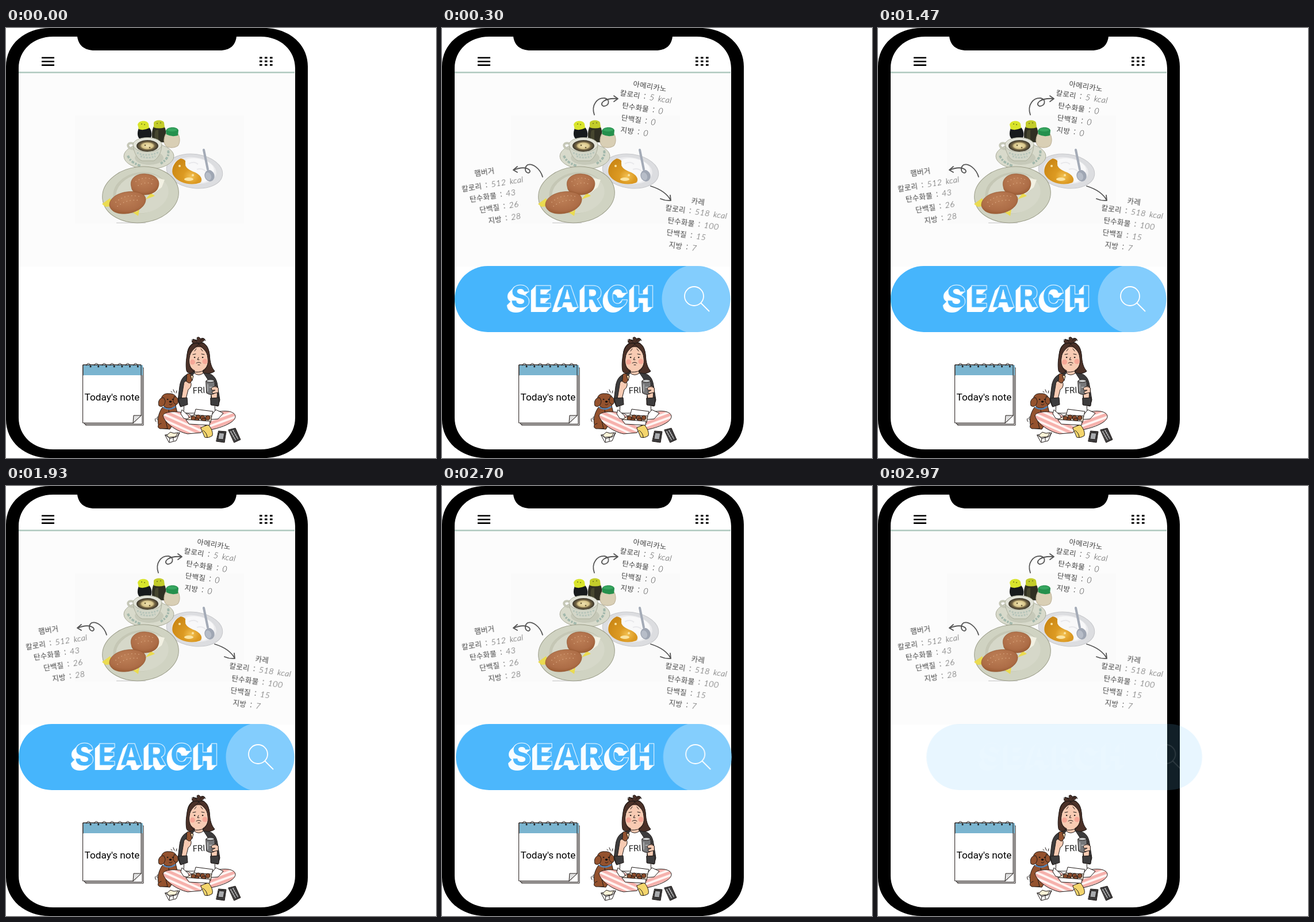
These frames come from a looping animation (748 by 748 pixels, 3.01 s). An HTML page:

```html
<!DOCTYPE html>
<html lang="ko">
<head>
<meta charset="utf-8">
<title>Meal search</title>
<style>
html, body { margin: 0; width: 100%; height: 100%; overflow: hidden; background: #fff; }
svg { display: block; width: 100vw; height: 100vh; }

.slide { animation: slide 3010ms linear infinite; }
.fade { animation: fade 3010ms linear infinite; }
.soft { animation: soft 3010ms linear infinite; }
.notes { animation: appear 3010ms linear infinite; }

@keyframes slide {
  0% { transform: translateX(-71px); }
  10%, 89.4% { transform: none; }
  100% { transform: translateX(71px); }
}
@keyframes fade {
  0%, 100% { opacity: 0; }
  10%, 89.4% { opacity: 1; }
}
@keyframes soft {
  0% { opacity: 0; animation-timing-function: ease-in; }
  10%, 89.4% { opacity: 1; }
  100% { opacity: 0; }
}
@keyframes appear {
  0% { opacity: 0; }
  10%, 100% { opacity: 1; }
}

.notes text { font: 300 12.5px "Noto Sans CJK KR", "Noto Sans CJK", "Noto Sans CJK JP", sans-serif; letter-spacing: .3px; word-spacing: 2.5px; fill: #444; }
.notes tspan { font: italic 300 14.5px Lato, sans-serif; }
.notes path { fill: none; stroke: #555; stroke-width: 1.8; stroke-linecap: round; stroke-linejoin: round; }
.search { font: 800 52px Inter, sans-serif; letter-spacing: 6.5px; text-anchor: middle; }
.ink { stroke: #201a18; stroke-width: 1; stroke-linejoin: round; stroke-linecap: round; }
.line { fill: none; }
.skin { fill: #f8cbb3; }
.dark { fill: #3d3c3d; }
.hair { fill: #4b3128; }
.dog { fill: #94522e; }
.white { fill: #fff; }
</style>
</head>
<body>
<svg viewBox="0 0 748 748" xmlns="http://www.w3.org/2000/svg">
<defs>
  <text id="word" class="search" x="247.500" y="486">SEARCH</text>
  <mask id="shade" maskUnits="userSpaceOnUse" x="80" y="430" width="320" height="80">
    <g id="depth" fill="#fff"></g>
    <use href="#word" fill="#000"/>
  </mask>
  <clipPath id="pill"><rect x="22" y="414" width="479.5" height="115" rx="57.5"/></clipPath>
  <pattern id="stripe" width="9" height="9" patternUnits="userSpaceOnUse" patternTransform="rotate(24)">
    <rect width="9" height="9" fill="#fff6f4"/><rect width="9" height="5.2" fill="#f6b1ac"/>
  </pattern>
  <pattern id="stripe2" width="9" height="9" patternUnits="userSpaceOnUse" patternTransform="rotate(-20)">
    <rect width="9" height="9" fill="#fff6f4"/><rect width="9" height="5.2" fill="#f6b1ac"/>
  </pattern>
  <radialGradient id="bun" cx=".45" cy=".35" r=".7">
    <stop offset="0" stop-color="#bd7f56"/><stop offset=".7" stop-color="#ad6d47"/><stop offset="1" stop-color="#96572f"/>
  </radialGradient>
  <radialGradient id="curry" cx=".65" cy=".7" r=".8">
    <stop offset="0" stop-color="#f3c153"/><stop offset=".35" stop-color="#dc9a22"/><stop offset="1" stop-color="#c98514"/>
  </radialGradient>
  <radialGradient id="coffee">
    <stop offset="0" stop-color="#f0e2b0"/><stop offset=".5" stop-color="#d9c68b"/><stop offset=".68" stop-color="#746544"/><stop offset="1" stop-color="#39342a"/>
  </radialGradient>
</defs>

<!-- Screen -->
<rect x="22" y="79" width="480" height="336" fill="#fcfcfc"/>
<rect x="120" y="152" width="294" height="188" fill="#fafafa"/>
<rect x="22" y="76" width="480" height="2.6" fill="#b1cac1"/>
<path fill-rule="evenodd" d="M76 0H449C492 0 525 28 525 67V681C525 720 492 748 449 748H76C33 748 0 720 0 681V67C0 28 33 0 76 0Z
  M82 15H124C126 30 136 39 154 39H372C390 39 399 30 401 15H443C478 15 503 39 503 70V678C503 709 478 733 443 733H82C47 733 22 709 22 678V70C22 39 47 15 82 15Z"/>
<path stroke="#000" stroke-width="2.6" d="M62 51.8H84M62 58.2H84M62 64.6H84"/>
<path stroke="#000" stroke-width="3" stroke-dasharray="4.6 4.4" d="M441 51.7H464M441 58H464M441 64.3H464"/>

<!-- Sauce bottles -->
<g>
  <path fill="#171a1c" d="M231 174C227 184 229 192 235 194H250C255 189 254 178 249 173Z"/>
  <path fill="#d9e52c" d="M229 168C231 160 246 160 248 167L249 174Q239 179 231 176Z"/>
  <path fill="#2f2f22" d="M257 171C252 182 253 194 258 198L275 199C280 190 279 176 275 171Z"/>
  <path fill="#c3cc2b" d="M257 165C258 159 274 159 275 165L276 173Q266 176 257 173Z"/>
  <path fill="#46462f" d="M260 178Q257 188 260 194L265 195V177Z"/>
  <path fill="#d9cfb5" stroke="#b9ad92" d="M278 184C273 193 274 204 281 207Q291 210 299 205C304 198 302 188 299 184Z"/>
  <path fill="#25904d" d="M278 179C280 171 298 171 300 178L299 187Q288 190 279 185Z"/>
  <ellipse cx="289" cy="177" rx="9" ry="3" fill="#37a660"/>
  <g fill="#6f7517"><circle cx="236" cy="167" r="1"/><circle cx="241" cy="168" r="1"/><circle cx="263" cy="166" r="1"/><circle cx="269" cy="165" r="1"/></g>
</g>

<!-- Curry -->
<g>
  <ellipse cx="328" cy="249" rx="49" ry="29.5" transform="rotate(8 328 249)" fill="#dcdde0" stroke="#c6c7ca"/>
  <ellipse cx="327" cy="248" rx="39" ry="23" transform="rotate(8 327 248)" fill="#ececee"/>
  <path fill="url(#curry)" d="M304 227C292 232 286 247 291 256C299 270 322 275 338 269C344 262 336 254 329 251C321 247 315 246 312 239Q316 229 304 227Z"/>
  <path fill="#f8f8f9" d="M313 229C325 223 348 228 357 237C370 250 354 267 341 269Q343 258 329 251C316 247 309 239 313 229Z"/>
  <path fill="none" stroke="#e9e9ec" stroke-width="2" d="M318 236Q328 231 334 237M332 246Q341 243 347 249"/>
  <g fill="#fae3a0"><ellipse cx="318" cy="263" rx="8" ry="3"/><circle cx="302" cy="240" r="2"/><circle cx="325" cy="256" r="2"/></g>
  <path stroke="#a4abb7" stroke-width="4" stroke-linecap="round" d="M344 212L351 246"/>
  <ellipse cx="354" cy="257" rx="8.5" ry="10" transform="rotate(-18 354 257)" fill="#9fa6b3"/>
  <ellipse cx="352" cy="258" rx="5" ry="7" transform="rotate(-18 352 258)" fill="#b7bdc8"/>
</g>

<!-- Coffee cup -->
<g>
  <ellipse cx="248.500" cy="223" rx="43.500" ry="22.500" fill="#d8dacb" stroke="#a9ab98"/>
  <ellipse cx="249" cy="226" rx="25" ry="12" fill="#c6c9b9"/>
  <g fill="none" stroke="#a3b8ac" stroke-width="4" stroke-dasharray="5 2 3 2">
    <path d="M212 222Q216 234 235 240M282 213Q285 226 269 236"/>
  </g>
  <path fill="none" stroke="#c5c7b7" stroke-width="4" d="M226 210C215 212 209 205 214 201Q219 199 226 203"/>
  <path fill="#d3d6c8" stroke="#a3a591" stroke-width=".8" d="M221 203C222 217 229 229 237 231H257C266 226 271 214 271 202Z"/>
  <path fill="none" stroke="#b7c5ba" stroke-width="3" stroke-dasharray="3 2" d="M228 217Q244 225 266 216M234 223Q246 228 260 223"/>
  <ellipse cx="246" cy="203" rx="25" ry="12.500" fill="#e2e3d8" stroke="#a3a591" stroke-width=".8"/>
  <ellipse cx="246" cy="205" rx="19" ry="10" fill="url(#coffee)"/>
  <circle cx="242" cy="204" r="1.300" fill="#6d5e3b"/><circle cx="250" cy="208" r="1.300" fill="#6d5e3b"/>
</g>

<!-- Burgers -->
<g>
  <path stroke="#ddd" stroke-width="2" d="M192 339H243"/>
  <ellipse cx="234" cy="290" rx="66.500" ry="48.500" transform="rotate(-7 234 290)" fill="#d0d3c2" stroke="#9a9c87"/>
  <ellipse cx="234" cy="287" rx="48" ry="36" transform="rotate(-10 234 287)" fill="#c5c7b5"/>
  <ellipse cx="237" cy="288" rx="46" ry="34" transform="rotate(-10 237 288)" fill="#d6d8c9"/>
  <path fill="#f2f1e3" d="M258 260L276 264L271 277L254 290Z"/>
  <path fill="#eadb51" d="M167 306L181 296L188 310L173 311ZM218 319L230 327L232 316ZM243 298L259 292L252 287Z"/>
  <path fill="#f4efdb" d="M180 308Q199 326 228 319L243 296L230 290Z"/>
  <path fill="url(#bun)" stroke="#93552f" stroke-width=".7" d="M218 276C214 261 229 252 244 254C259 255 269 264 265 276C262 288 247 291 235 290C225 288 219 285 218 276Z"/>
  <path fill="url(#bun)" stroke="#93552f" stroke-width=".7" d="M180 309C179 297 193 287 211 285C230 283 244 289 243 299C242 312 226 322 207 323C192 324 182 318 180 309Z"/>
  <path fill="none" stroke="#dcaa83" stroke-width="1.500" stroke-linecap="round" stroke-dasharray=".1 6" d="M226 267Q240 257 256 264M230 274Q244 266 256 272M191 303Q208 288 232 293M194 310Q211 297 232 300"/>
</g>

<!-- Nutrition notes -->
<g class="notes">
  <path d="M265 151C259 134 270 121 283 122C293 124 291 136 281 136C273 133 280 121 306 123M299 118L306 123L299 128"/>
  <path d="M175 259C171 245 158 235 149 238C142 243 145 253 151 252C158 248 146 238 125 247M131 241L124 247L131 251"/>
  <path d="M363 275Q389 283 398 300M380 297Q389 301 398 300L397 291"/>
  <g transform="translate(309 117) rotate(9)">
    <text x="20" y="-19">아메리카노</text>
    <text>칼로리 : <tspan>5 kcal</tspan></text>
    <text x="7" y="21">탄수화물 : <tspan>0</tspan></text>
    <text x="9" y="42">단백질 : <tspan>0</tspan></text>
    <text x="11" y="63">지방 : <tspan>0</tspan></text>
  </g>
  <g transform="translate(35 285) rotate(-9)">
    <text x="26" y="-23">햄버거</text>
    <text>칼로리 : <tspan>512 kcal</tspan></text>
    <text x="11" y="20">탄수화물 : <tspan>43</tspan></text>
    <text x="25" y="41">단백질 : <tspan>26</tspan></text>
    <text x="37" y="62">지방 : <tspan>28</tspan></text>
  </g>
  <g transform="translate(388 317) rotate(8)">
    <text x="43" y="-18">카레</text>
    <text>칼로리 : <tspan>518 kcal</tspan></text>
    <text x="7" y="21">탄수화물 : <tspan>100</tspan></text>
    <text x="8" y="42">단백질 : <tspan>15</tspan></text>
    <text x="15" y="63">지방 : <tspan>7</tspan></text>
  </g>
</g>

<!-- Notepad -->
<g class="ink">
  <path class="white" d="M139 591H239V691H139Z"/>
  <path class="white" d="M137 589H237V689H137Z"/>
  <path class="white" d="M134 586H235V674L221 687H134Z"/>
  <path fill="#7ab4cf" stroke="none" d="M134.600 586.600H238V604H134.600Z"/>
  <path class="line" d="M134 604V586H235V604"/>
  <path fill="#e0e0e0" d="M221 687L222 674H235Z"/>
  <g id="rings"></g>
</g>
<text x="136.500" y="648" font-family="Roboto, sans-serif" font-size="17.200">Today's note</text>

<!-- Dog -->
<g class="ink">
  <path class="dog" d="M272 660C264 671 262 686 267 696L285 698L299 676L294 658Z"/>
  <path class="dog" d="M270 688C264 689 262 695 268 697H281L278 684"/>
  <path class="dog" d="M283 663L284 679L298 669L295 657"/>
  <path class="dog" d="M271 648C268 640 276 635 283 636C292 635 298 641 297 648C299 655 293 662 284 661C276 662 271 655 271 648Z"/>
  <path class="dog" d="M274 643C266 643 264 651 266 657C271 661 277 656 277 649Z"/>
  <path class="dog" d="M293 641C300 642 301 649 298 654C294 656 291 652 291 648Z"/>
  <path class="line" stroke="#5686b8" stroke-width="2.500" d="M274 660Q284 666 294 659"/>
  <circle cx="281" cy="646" r=".8"/><circle cx="290" cy="646" r=".8"/><ellipse cx="286" cy="650" rx="2" ry="1.300"/>
  <path class="line" d="M284 655Q287 657 289 654M287 632L289 634M291 629L293 634M297 631L296 635M260 679Q258 682 261 685M264 676Q261 679 263 681"/>
</g>

<!-- Girl -->
<g class="ink">
  <path class="hair" d="M315 571C315 555 323 546 335 546C348 546 353 557 354 570C354 584 357 591 363 597C356 602 347 600 343 597L322 599C312 599 314 583 315 571Z"/>
  <path class="skin" d="M328 589V603Q335 608 343 602V589Z"/>
  <path class="white" d="M327 600Q335 607 344 600L360 608L364 670H309L312 609Z"/>
  <path class="dark" d="M327 600C310 601 304 610 302 624L299 648L303 658L315 654L312 640L318 620L322 608Z"/>
  <path class="dark" d="M344 600C359 600 366 607 368 622L372 647L369 658L356 655L357 637L352 613Z"/>
  <path class="skin" d="M305 645L309 621Q309 613 316 614Q323 614 322 622Q321 627 317 629L313 645Z"/>
  <path class="skin" d="M367 646L368 630Q369 622 362 622L355 627Q351 633 357 638L358 645Z"/>
  <path class="dark" d="M300 644L315 643L316 655L304 659Z"/>
  <path class="dark" d="M356 644L371 643L370 657L357 656Z"/>
  <path fill="#935331" d="M315 602Q323 599 324 607Q325 614 319 618L314 615Z"/>
  <path fill="#f0d5ad" d="M321 604L326 605L324 613Z"/>
  <path fill="#77787a" d="M348 614Q355 610 363 614L364 635Q356 640 349 635Z"/>
  <ellipse cx="355.500" cy="614" rx="7" ry="2.600" fill="#c4c6c7"/>
  <path stroke="#ddd" class="line" d="M351 620V632M354 625H360"/>
  <path class="skin" d="M369 626Q362 621 357 627L358 630H364L358 633L360 636L369 634Z"/>
  <path class="skin" stroke="none" d="M317 574C318 562 327 555 335 555C344 555 351 563 352 574C353 587 345 597 335 597C325 597 316 587 317 574Z"/>
  <path class="hair" d="M336 549C329 558 320 561 319 574C317 583 321 593 327 598C323 602 315 601 314 596C312 586 314 571 316 564C319 552 327 546 336 549Z"/>
  <path class="hair" d="M335 549C341 558 350 560 351 574C353 585 348 594 342 598C349 603 358 601 363 597C357 590 355 582 354 568C352 553 345 545 335 549Z"/>
  <path class="line" d="M325 598Q335 600 344 596M328 562L331 558M342 562L339 558"/>
  <path class="hair" d="M331 548C324 550 321 545 326 542L334 543C328 537 338 536 338 541C343 537 349 542 343 545L338 548Z"/>
  <path class="line" d="M332 546Q326 538 323 543M337 545Q345 536 347 544"/>
  <g fill="#f6a797" stroke="none"><circle cx="324.500" cy="581" r="4.500"/><circle cx="346" cy="580" r="4.500"/></g>
  <circle cx="328" cy="573" r=".8"/><circle cx="342" cy="573" r=".8"/>
  <path class="line" d="M325 568L330 567M340 567L345 568M335 573L333 577L336 577M331 583Q335 580 339 583M334 586L337 586"/>
  <text x="325" y="636" font-family="Roboto, sans-serif" font-size="15" fill="#222" stroke="none" transform="rotate(-3 325 636)">FRI</text>

  <path fill="url(#stripe2)" d="M360 670C376 664 397 665 399 675C400 687 370 697 350 700L320 704L314 690Z"/>
  <path fill="url(#stripe)" d="M317 671C301 666 276 666 273 674C275 686 296 702 316 706L339 704L347 692Z"/>
  <path fill="#f4d56c" d="M339 695L352 690Q361 701 359 709Q352 714 346 712Z"/>
  <path class="line" d="M343 700Q350 705 350 712"/>
  <path class="white" d="M317 674L306 664L304 671L309 679L319 681ZM356 675L365 664L378 670L369 680L357 681Z"/>
  <path class="white" d="M327 675L330 663L360 667L356 681Z"/>
  <path fill="#f3e6d2" d="M314 681L326 673L358 675L356 686Z"/>
  <g fill="#8b4c2c"><circle cx="326" cy="679" r="4"/><circle cx="334" cy="677" r="4"/><circle cx="342" cy="678" r="4"/><circle cx="351" cy="678" r="4"/><circle cx="332" cy="682" r="3.500"/><circle cx="344" cy="682" r="3.500"/></g>
  <path class="white" d="M313 681L355 684L354 691L319 689Z"/>
</g>

<!-- Floor items -->
<g class="ink">
  <path class="white" d="M277 708L302 704L296 718L284 721Z"/>
  <path fill="#fbf3d8" d="M280 708L286 703L292 705L299 704L295 711L284 712Z"/>
  <path class="line" d="M277 708L285 714L297 711L302 704M285 714L284 720M291 713L291 718"/>
  <path class="dark" d="M370 701L383 702L380 721L366 719Z"/>
  <path fill="#a8aaad" d="M371 704L380 705L378 716L369 715Z"/>
  <path class="dark" d="M387 699L399 696L408 716L397 721Z"/>
  <path stroke="#bbb" stroke-width="1.800" stroke-dasharray="2 2" d="M391 702L399 716M395 700L403 714"/>
</g>

<!-- Search bar -->
<g class="slide">
  <rect class="fade" x="22" y="414" width="479.500" height="115" rx="57.500" fill="#46b5fc"/>
  <g class="soft"><circle cx="442.500" cy="471.500" r="60" fill="#fff" fill-opacity=".33" clip-path="url(#pill)"/></g>
  <g class="fade">
    <rect x="80" y="430" width="320" height="80" fill="#fff" mask="url(#shade)"/>
    <use href="#word" fill="none" stroke="#fff"/>
  </g>
  <g class="fade" fill="none" stroke="#fff" stroke-width="1.800" stroke-linecap="round">
    <circle cx="438.500" cy="466.500" r="16.500"/><path d="M450.500 478.500L464.500 492.500"/>
  </g>
</g>
</svg>
<script>
const repeat = (id, n, make) => {
  document.getElementById(id).innerHTML = Array.from({ length: n }, (_, i) => make(i)).join('');
};
repeat('depth', 8, i => `<use href="#word" x="${-i - 1}" y="${i + 1}"/>`);
repeat('rings', 7, i => {
  const x = 144 + i * 13.7;
  return `<path class="line" d="M${x - 4} 587C${x - 4} 582 ${x + 3} 582 ${x + 3} 588"/><circle cx="${x + 3}" cy="589" r="1"/>`;
});
</script>
</body>
</html>
```
